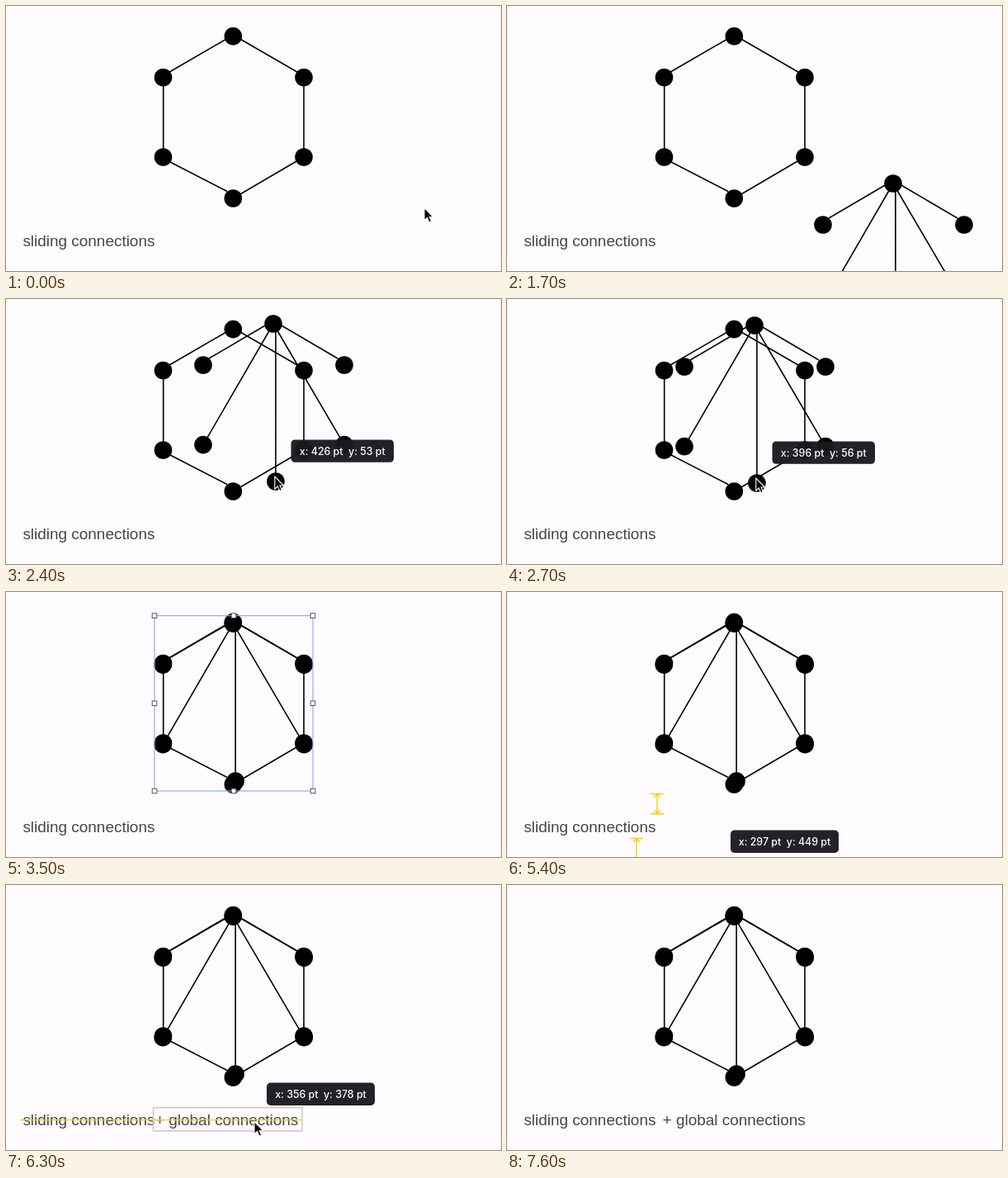
Write an HTML page that moves like this. It is 600 by 321 pixels and loops after 8 s.

```html
<!DOCTYPE html>
<html lang="en">
<head>
<meta charset="utf-8">
<title>Sliding connections</title>
<style>
  html, body { margin: 0; width: 100%; height: 100%; overflow: hidden; background: #fefcff; }
  svg { display: block; width: 100%; height: 100%; }
  .label { font: 18.95px "Liberation Sans", Arial, sans-serif; fill: #474549; }
  .tip { font: 500 12.4px Inter, sans-serif; fill: #fff; text-anchor: middle; white-space: pre; }
  .edge { stroke: #000; stroke-width: 1.6; fill: none; }
  .guide { stroke: #f4cd14; stroke-width: 1.4; fill: none; }
  .select { stroke: #8fb0e4; stroke-width: 1.2; fill: none; }
  .handle { stroke: #555; stroke-width: 1; fill: #fff; }
</style>
</head>
<body>
<svg viewBox="0 0 600 321">
  <rect width="600" height="321" fill="#fefcff"/>
  <g id="hex"></g>
  <g id="fan"></g>
  <g id="graphSel"></g>
  <text class="label" x="20.4" y="291.4">sliding connections</text>
  <g id="added">
    <rect id="frame" x="178.5" y="269.7" width="180.5" height="28.2" fill="none" stroke="#c9c7cb" stroke-width="1.5"/>
    <text class="label" x="181" y="291.4">+ global connections</text>
    <g id="textSel"></g>
  </g>
  <path id="gaps" class="guide" d="M174 244.5h16M174 268.8h16M182 245v23.5m-4-4 4 4 4-4M178 249l4-4 4 4M149 298.5h16M157 299v24M153 303l4-4 4 4"/>
  <path id="row" class="guide"/>
  <path id="column" class="guide" d="M276.2 26V298"/>
  <g id="tip">
    <rect id="tipBox" height="27.3" rx="4.5" fill="#1b191e" fill-opacity=".96"/>
    <text id="tipText" class="tip" y="18.2"></text>
  </g>
  <path id="cursor" d="M0 0V15.2L3.5 12 6 17.6 8.6 16.4 6.2 11H10.8Z" fill="#000" stroke="#fff" stroke-width="1.1"/>
</svg>
<script>
const LOOP = 8000, STEP = 100;
const $ = id => document.getElementById(id);
const show = (id, on) => { $(id).style.display = on ? '' : 'none'; };
const move = (id, x, y) => $(id).setAttribute('transform', `translate(${x.toFixed(2)} ${y.toFixed(2)})`);

const graph = (nodes, edges) =>
  `<path class="edge" d="${edges}"/>` +
  nodes.map(([x, y]) => `<circle cx="${x}" cy="${y}" r="10.8"/>`).join('');
const handle = ([x, y]) =>
  `<rect class="handle" x="${x - 2.8}" y="${y - 2.8}" width="5.6" height="5.6"/>`;

$('hex').innerHTML = graph(
  [[275.3, 36.6], [361, 86.5], [361, 183], [275.3, 233], [190.5, 183], [190.5, 86.5]],
  'M268 39.5 198 80M283 39.5 353 80M190.7 86V183M361 86V183M198 188.5 268 224.5M283 228.5 353 187.5');

// Fan coordinates are relative to its top node.
$('fan').innerHTML = graph(
  [[0, 0], [-85, 50], [86, 50], [-85, 146.6], [86, 146.6], [2.9, 191]],
  'M-8 1-78 42M8 1 78 42M0 0-85 146.6M0 0 86 146.6M2.9 4V191');

$('graphSel').innerHTML =
  '<rect class="select" x="180" y="28.7" width="192" height="212.3"/>' +
  [28.7, 134.8, 241].flatMap(y => [180, 276, 372].map(x => [x, y]))
    .filter(([x, y]) => x !== 276 || y !== 134.8).map(handle).join('');

$('textSel').innerHTML =
  '<rect class="select" x="178.5" y="269.7" width="180.5" height="28.2"/>' +
  [[178.5, 284], [359, 284]].map(handle).join('');

// Keys are [time, x, y].
const fanPath = [
  [1600, 494, 290], [1700, 468, 215], [1800, 440, 150], [1900, 415, 105], [2000, 392, 72],
  [2100, 371, 49.5], [2400, 324, 30], [2700, 300, 32], [3000, 283, 36], [3300, 275.2, 38.1]
];
const textPath = [
  [5400, -45, 54], [5600, -35, 37], [5900, -14, 8], [6100, -6, 1],
  [6200, -4, 0], [6300, 0, 0], [6500, 5, 0]
];

function along(keys, t) {
  if (t <= keys[0][0]) return keys[0].slice(1);
  for (let i = 1; i < keys.length; i++) {
    const a = keys[i - 1], b = keys[i];
    if (t <= b[0]) {
      const k = (t - a[0]) / (b[0] - a[0]);
      return [a[1] + (b[1] - a[1]) * k, a[2] + (b[2] - a[2]) * k];
    }
  }
  return keys[keys.length - 1].slice(1);
}

function setTip(x, y, px, py) {
  const w = py > 99 ? 131 : 124.5;
  move('tip', x, y);
  $('tipBox').setAttribute('width', w);
  $('tipText').setAttribute('x', w / 2);
  $('tipText').textContent = `x: ${px} pt\u00a0 y: ${py} pt`;
}

function cursorAt(t, fan, text) {
  if (t < 100) return [507, 244.5];
  if (t < 200) return [518, 304];
  if (t >= 1600 && t < 3300) return [fan[0] + 1.8, fan[1] + 185];
  if (t >= 3300 && t < 3500) return [279.5, 221.5];
  if (t >= 5400 && t < 7200) return [301 + text[0], 286.5 + text[1]];
  if (t >= 7200 && t < 7300) return [304, 292];
  return null;
}

function draw(t) {
  const fan = along(fanPath, t), text = along(textPath, t);
  const dragFan = t >= 1600 && t < 3300;
  const dragText = t >= 5400 && t < 6800;
  const snapped = t >= 6500;

  show('fan', t >= 1600);
  move('fan', ...fan);
  show('graphSel', t >= 3300 && t < 4200);

  const dx = snapped ? 7.6 : text[0];
  show('added', t >= 5400);
  move('added', dx, text[1]);
  show('frame', dragText);
  show('textSel', t >= 6800 && t < 7600);

  show('gaps', t >= 5400 && t < 5500);
  show('row', t >= 6200 && t < 6800);
  $('row').setAttribute('d', `M17 284.6H${359 + dx}`);
  show('column', snapped && t < 6800);

  show('tip', dragFan || dragText);
  if (dragFan) {
    setTip(fan[0] + 21.5, fan[1] + 140.4,
      Math.round(486 + (fan[0] - 371) * 1.268), Math.round(80 + (fan[1] - 49.5) * 1.37));
  } else if (dragText) {
    setTip(316 + text[0], 239.6 + text[1] * .907,
      Math.round(356 + text[0] * 1.311), Math.round(378 + text[1] * 1.315));
  }

  const c = cursorAt(t, fan, text);
  show('cursor', c);
  if (c) move('cursor', ...c);
}

const start = performance.now();
function tick() {
  const t = (performance.now() - start) % LOOP;
  draw(Math.floor(t / STEP) * STEP);
  requestAnimationFrame(tick);
}
tick();
</script>
</body>
</html>
```
